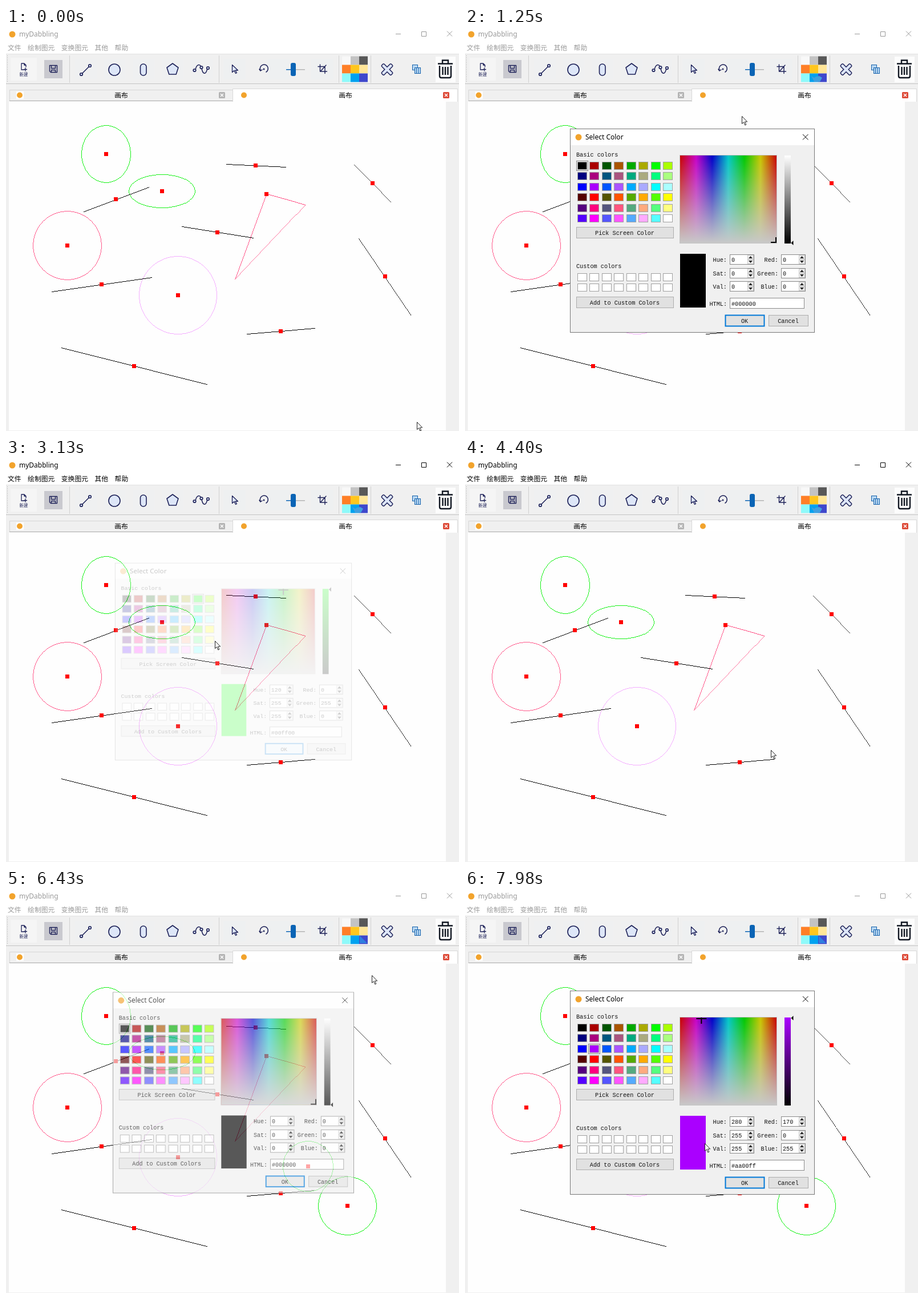
Animation of 794x705 px, one loop 8000 ms. Source, as an HTML page:

```html
<!DOCTYPE html>
<html lang="zh">
<head>
<meta charset="utf-8">
<style>
html, body { margin: 0; width: 100%; height: 100%; overflow: hidden; background: #f0f0f0; }
svg { display: block; width: 100vw; height: 100vh; }
text { font-family: "Noto Sans", "Noto Sans CJK SC", "Noto Sans CJK", sans-serif; font-size: 12px; white-space: pre; }
.cjk { font-family: "Noto Sans CJK SC", "Noto Sans CJK", sans-serif; font-size: 11.8px; }
.mono { font-family: "Liberation Mono", monospace; font-size: 10.2px; fill: #111; }
.crisp { shape-rendering: crispEdges; }
.mid { text-anchor: middle; }
.end { text-anchor: end; }
</style>
</head>
<body>
<svg id="stage" viewBox="0 0 794 705" preserveAspectRatio="none"></svg>
<script>
const stage = document.getElementById('stage');
const NAVY = '#1d2158', PALE = '#dde6f8', LOGO = '#f2a32c';
const GREEN = '#00f000', PINK = '#ff4a80', VIOLET = '#f3a6ff';

// Markup helpers
const tag = (name, attrs, body = '') =>
  `<${name} ${Object.entries(attrs).map(([k, v]) => `${k}="${v}"`).join(' ')}>${body}</${name}>`;
const rect = (x, y, width, height, fill, more) => tag('rect', { x, y, width, height, fill, ...more });
const box = (x, y, w, h, fill, stroke, more) => rect(x + .5, y + .5, w, h, fill, { stroke, ...more });
const path = (d, stroke, width = 1, fill = 'none', more) =>
  tag('path', { d, stroke, 'stroke-width': width, fill, ...more });
const disc = (cx, cy, r, fill, more) => tag('circle', { cx, cy, r, fill, ...more });
const text = (x, y, s, more) => tag('text', { x, y, ...more }, s);
const mono = (x, y, s, cls = '', more) => text(x, y, s, { class: 'mono ' + cls, ...more });
const each = (n, f) => Array.from({ length: n }, (_, i) => f(i)).join('');
const crisp = { class: 'crisp' };

function chrome() {
  let x = 3;
  const menu = ['文件', '绘制图元', '变换图元', '其他', '帮助'].map(s => {
    const item = text(x, 39, s, { class: 'cjk', fill: 'currentColor' });
    x += s.length * 11.8 + 11.5;
    return item;
  }).join('');
  return rect(0, 0, 794, 705, '#f0f0f0') + rect(0, 0, 794, 45, '#fff') + disc(11, 11, 5.5, LOGO)
    + tag('g', { id: 'frame' }, text(23, 15, 'myDabbling', { fill: 'currentColor' }) + menu
      + path('M683 10.5h9M728.5 6.5h8v8h-8zM773 5.5l9 9m0-9l-9 9', 'currentColor'));
}

function toolbar() {
  const cells = ['#f8f8f8', '#c3c3c3', '#585858', '#ff7f27', '#ffc61e', '#ffe699', '#8efafa', '#00a2f0', '#3f48cc'];
  const ink = { stroke: NAVY, 'stroke-width': 1.6, 'stroke-linejoin': 'round' };
  const lines = (d, w = 1.5, fill) => path(d, NAVY, w, fill, { 'stroke-linejoin': 'round', 'stroke-linecap': 'round' });
  const knob = (x, y) => disc(x, y, 2.3, PALE, ink);
  const corners = Array.from({ length: 5 }, (_, i) =>
    [292 + 10.5 * Math.sin(i * Math.PI * .4), 72.5 - 10.5 * Math.cos(i * Math.PI * .4)]);
  const bars = (w, color, more) => [45, 135].map(a =>
    rect(668 - 11, 72.5 - w / 2, 22, w, color, { rx: 1, transform: `rotate(${a} 668 72.5)`, ...more })).join('');
  return path('M0 45.5h794', '#e2e2e2') + path('M0 97.5h794', '#c4c4c4')
    + path('M2.5 48v47', '#a5a5a5', 1, 'none', { 'stroke-dasharray': '1 2' })
    + [111, 373, 583, 639].map(x => rect(x, 48, 1, 48, '#d0d0d0')).join('')
    + rect(8, 52, 46, 40, '#f5f5f5') + rect(67, 56, 32, 32, '#c9c9cf')
    + lines('M32 73h-5v-11h5l3 3v3M32 62v3h3M34 70v5M31.5 72.5h5', 1.3)
    + text(31, 84, '新建', { class: 'cjk mid', fill: NAVY, style: 'font-size:7.5px' })
    + lines('M76.5 65.5h13v12h-11l-2-2zM79.5 65.5v5h7v-5M79.5 77v-3.5h7v3.5', 1.4)
    + each(5, i => rect(121 + i * 50.75, 54, 38, 36, '#eff0f1'))
    + lines('M132 81l15-15') + knob(132, 81) + knob(147, 66)
    + disc(190, 73, 10, PALE, ink) + rect(235.5, 63, 10.5, 20, PALE, { rx: 5, ...ink })
    + tag('polygon', { points: corners.join(' '), fill: PALE, ...ink })
    + lines('M332 73c2-10 9-12 11-2s7 12 10 0') + knob(330.5, 74) + knob(342.5, 69) + knob(354, 70)
    + each(3, i => rect(381 + i * 77, 54, 39, 36, '#eef0f1'))
    + lines('M396.5 64.5v13l3.5-3l2.5 5l2-1l-2.5-4.5h4.5z', 1.3, PALE)
    + lines('M446 74a7 7 0 1 1 10 3M444 72l2 3l3-2') + disc(452, 72, 1.4, NAVY)
    + rect(491, 72, 9, 1.5, '#0b64b5') + rect(508, 72, 16, 1.5, '#b5b5b5')
    + rect(499, 61, 9, 23, '#0b64b5', { rx: 3 })
    + lines('M550.5 64v12h12M547 67.5h12v12M551 76l10-11', 1.4)
    + cells.map((c, i) => rect(589 + i % 3 * 15, 49.5 + (i / 3 | 0) * 15, 15, 15, c)).join('')
    + path('M607 84l5 3l3-2l6-1l5 3l-4 7h-10z', 'none', 0, '#3f9fe0', { id: 'smudgeA' })
    + path('M620 80v13h13z', 'none', 0, '#2f7fe0', { id: 'smudgeB' })
    + bars(4.5, PALE, { stroke: NAVY, 'stroke-width': 3 }) + bars(4.5, PALE)
    + box(712, 64, 9, 9, '#b9d8f2', '#1763ad') + box(716, 69, 10, 10, '#b9d8f2', '#1763ad')
    + path('M719.5 69v10M723 69v10', '#1763ad')
    + rect(753, 50, 35, 45, '#fcfcfc')
    + path('M757 62.5h26M765 62v-5.5h10v5.5M760 66v18q0 3 3 3h14q3 0 3-3v-18', '#111722', 2.4)
    + each(3, i => rect(764.3 + i * 4.5, 68, 2.4, 14, '#111722'));
}

function tabs() {
  const tab = (x, close, color) => disc(x, 117.5, 5, LOGO)
    + text(x + 178, 121.5, '画布', { class: 'cjk mid' })
    + rect(close - 5.5, 112, 11, 11, color, { rx: 1.5 })
    + path(`M${close - 2.5} 115l5 5m0-5l-5 5`, '#fff', 1.4);
  return rect(5, 128, 766, 576, '#fefefe')
    + box(6, 108, 391, 19, '#f0f0f0', '#d6d6d6') + box(397, 106, 394, 22, '#fff', '#d9d9d9')
    + rect(6, 127, 391, 1, '#a8a8a8') + rect(398, 126, 393, 3, '#fefefe') + rect(18, 111, 13, 13, '#fff')
    + tab(24, 378.5, '#b4b4b4') + tab(417, 771.5, '#dd4b39');
}

// Canvas shapes: one pixel along the longer axis, no smoothing
const dot = (x, y) => rect(x - 3, y - 3, 7, 7, '#f00', crisp);
const ring = (cx, cy, rx, ry, stroke) => tag('ellipse',
  { cx: cx + .5, cy: cy + .5, rx, ry, stroke, 'stroke-width': .9, fill: 'none', ...crisp }) + dot(cx, cy);
function line(x, y, x2, y2, color = '#000') {
  const dx = x2 - x, dy = y2 - y;
  const width = Math.max(Math.abs(dx), Math.abs(dy)) / Math.hypot(dx, dy);
  return path(`M${x + .5} ${y + .5}l${dx} ${dy}`, color, width, 'none', crisp);
}
const handled = (x, y, x2, y2) => line(x, y, x2, y2) + dot((x + x2) >> 1, (y + y2) >> 1);

const drags = [
  { cx: 529, cy: 483, r: 44, from: 4540, to: 4690, turn: .7 },
  { cx: 598, cy: 552, r: 51, from: 4910, to: 5120, turn: .6 },
];

function drawing() {
  return ring(175, 220, 43, 50, GREEN) + ring(273, 285, 58, 29, GREEN)
    + ring(107, 380, 60, 60, PINK) + ring(301, 467, 68, 68, VIOLET)
    + line(456, 290, 524, 309, PINK) + line(524, 309, 401, 439, PINK) + line(401, 439, 456, 290, PINK)
    + dot(456, 290)
    + handled(385, 238, 490, 243) + handled(610, 238, 674, 304)
    + handled(135, 321, 250, 278) + handled(307, 347, 433, 367)
    + handled(79, 461, 255, 436) + handled(421, 535, 541, 525)
    + handled(618, 367, 710, 502) + handled(96, 559, 352, 623)
    + drags.map((d, i) => tag('g', { id: 'drag' + i }, ring(d.cx, d.cy, d.r, d.r, GREEN))).join('');
}

// Colour dialog: swatches run down the columns, blue fastest, then red, then green
const swatchX = i => 197 + Math.round((i / 6 | 0) * 21.43);
const swatchY = i => 234 + Math.round(i % 6 * 18.4);
const swatchRgb = i => [(i / 3 | 0) % 4 * 85, (i / 12 | 0) * 85, Math.floor(i % 3 * 127.5)];
const css = rgb => `rgb(${rgb})`;

function dialog() {
  const stop = (offset, color, opacity = 1) => tag('stop', { offset, 'stop-color': color, 'stop-opacity': opacity });
  const fade = (id, stops, more) => tag('linearGradient', { id, ...more }, stops);
  const down = { x2: 0, y2: 1 };
  const defs = tag('defs', {}, fade('hue', each(7, i => stop(i / 6, `hsl(${360 - i * 60},100%,39.2%)`)))
    + fade('sat', stop(0, '#c8c8c8', 0) + stop(1, '#c8c8c8'), down)
    + fade('val', '<stop id="valTop"/>' + stop(1, '#000'), down)
    + tag('clipPath', { id: 'field' }, rect(377, 223, 169, 153, '#000')));
  const button = (x, y, w, s, more) => box(x, y, w, 19, '#e1e1e1', '#adadad', more) + mono(x + w / 2, y + 14, s, 'mid');
  const cell = (i, y, color) => box(swatchX(i), y, 16, 13, color, '#a0a0a0');
  const spin = (s, i) => {
    const x = i < 3 ? 464 : 554, y = 396 + Math.round(i % 3 * 23.5);
    return mono(x - 5, y + 13, s, 'end') + box(x, y, 42, 17, '#fff', '#8a8a8a') + mono(x + 3, y + 13, '', '', { id: 'num' + i })
      + each(2, k => box(x + 31, y + 1 + k * 8, 10, 7, '#f0f0f0', '#c8c8c8'))
      + path(`M${x + 33} ${y + 7}h7l-3.5-4zm0 4h7l-3.5 4z`, 'none', 0, '#222');
  };
  return defs + box(184, 176, 428, 356, '#f0f0f0', '#777') + rect(185, 177, 427, 28, '#fff')
    + disc(199, 191, 5.5, LOGO) + text(211, 195, 'Select Color') + path('M592 186l9.5 9.5m0-9.5l-9.5 9.5', '#000')
    + mono(195, 225, 'Basic colors') + mono(195, 420, 'Custom colors')
    + each(48, i => cell(i, swatchY(i), css(swatchRgb(i))))
    + each(16, i => cell((i >> 1) * 6, 429 + i % 2 * 18, '#fff'))
    + rect(0, 0, 20, 17, 'none', { id: 'pick', stroke: '#888' })
    + button(195, 348, 170, 'Pick Screen Color') + button(195, 470, 170, 'Add to Custom Colors')
    + rect(377, 223, 169, 153, 'url(#hue)') + rect(377, 223, 169, 153, 'url(#sat)')
    + box(376, 222, 170, 154, 'none', '#c4c4c4')
    + tag('g', { 'clip-path': 'url(#field)' }, path('M-9 0h18M0-9v18', '#000', 2, 'none', { id: 'cross' }))
    + rect(560, 223, 11, 154, 'url(#val)') + path('M0 0l4-4v8z', 'none', 0, '#000', { id: 'mark' })
    + rect(377, 395, 45, 94, '#000', { id: 'sample' })
    + ['Hue:', 'Sat:', 'Val:', 'Red:', 'Green:', 'Blue:'].map(spin).join('')
    + mono(459, 486, 'HTML:', 'end') + box(464, 472, 130, 18, '#fff', '#8a8a8a') + mono(467, 486, '', '', { id: 'html' })
    + button(456, 502, 68, 'OK', { id: 'ok', stroke: '#0078d7', 'stroke-width': 2 }) + button(532, 502, 69, 'Cancel');
}

stage.innerHTML = chrome() + toolbar() + tabs() + drawing() + tag('g', { id: 'dialog' }, dialog())
  + path('M.5 .5v13l3-2.8l2.3 5.3l2-.9l-2.3-5.1h4.2z', '#222', 1, '#fff', { id: 'cursor' });
const $ = id => document.getElementById(id);
const set = (id, attrs) => { for (const k in attrs) $(id).setAttribute(k, attrs[k]); };
const show = (id, on) => set(id, { visibility: on ? 'visible' : 'hidden' });
const ramp = (t, from, length) => Math.max(0, Math.min(1, (t - from) / length));

const LOOP = 8000;
const runs = [0, 70, 950, 1790, 2650, 3510, 4400, 5280, 6190, 7050, 7900];
function tick(now) {
  const start = runs.filter(r => r <= now).pop();
  return start + Math.floor(Math.floor((now - start + 9) / 78) * 7.8) * 10;
}

// Pointer: stops with arrival and departure, plus a few points on the way
const lime = 36, purple = 8;
const stay = (from, to, x, y) => [[from, x, y], [to, x, y]];
const onSwatch = (from, to, i) => stay(from, to, swatchX(i) + 5, swatchY(i) + 7);
const onPalette = (from, to) => stay(from, to, 617, 83);
const drag = d => [[d.from, d.cx, d.cy],
  ...stay(d.to, d.to + 70, d.cx + d.r * Math.cos(d.turn), d.cy + d.r * Math.sin(d.turn))];
const route = [
  ...stay(0, 70, 720, 689), ...onPalette(780, 950), [1020, 537, 125],
  ...onSwatch(1650, 1790, lime), [2020, 413, 382], ...stay(2280, 2960, 487, 515), [3110, 366, 318],
  ...stay(3600, 3760, 190, 73), [4400, 536, 509], ...drags.flatMap(drag), [5280, 637, 570],
  ...onPalette(5650, 6270), [6420, 641, 149], ...onSwatch(7360, 7500, purple), [7970, 420, 443],
];

function pointer(t) {
  const next = route.findIndex(k => k[0] > t);
  if (next < 0) return route[route.length - 1].slice(1);
  const [a, x, y] = route[next - 1], [b, x2, y2] = route[next], p = (t - a) / (b - a);
  return [Math.round(x + (x2 - x) * p), Math.round(y + (y2 - y) * p)];
}

function hsv([r, g, b]) {
  const max = Math.max(r, g, b), span = max - Math.min(r, g, b);
  if (!span) return [0, 0, max];
  const sector = max === r ? (g - b) / span + 6 : max === g ? (b - r) / span + 2 : (r - g) / span + 4;
  return [Math.round(sector * 60) % 360, Math.round(span / max * 255), max];
}

function choose(i) {
  const rgb = swatchRgb(i), [h, s, v] = hsv(rgb);
  [h, s, v, ...rgb].forEach((n, k) => { $('num' + k).textContent = n; });
  $('html').textContent = '#' + rgb.map(n => n.toString(16).padStart(2, '0')).join('');
  set('sample', { fill: css(rgb) });
  set('valTop', { 'stop-color': v ? css(rgb.map(n => n / v * 255)) : '#fff' });
  set('pick', { x: swatchX(i) - 1.5, y: swatchY(i) - 1.5 });
  set('cross', { transform: `translate(${377 + (360 - h) / 360 * 168} ${225 + (255 - s) / 255 * 150})` });
  set('mark', { transform: `translate(571.5 ${376 - v / 255 * 152})` });
}

function draw(now) {
  const t = tick(now);
  set('cursor', { transform: `translate(${pointer(t)})` });
  $('frame').style.color = t >= 770 && t < 950 || t >= 3030 && t < 6340 ? '#000' : '#999';
  show('smudgeA', t >= 770 && t < 5650);
  show('smudgeB', t >= 5650);
  drags.forEach((d, i) => {
    const r = d.r * ramp(t, d.from, d.to - d.from);
    show('drag' + i, r > 0);
    $('drag' + i).firstChild.setAttribute('rx', r);
    $('drag' + i).firstChild.setAttribute('ry', r);
  });
  const open = ramp(t, 919, 155) - ramp(t, 2986, 155) + ramp(t, 6319, 155);
  show('dialog', open > 0);
  set('dialog', { opacity: open, transform: `translate(399 354.5) scale(${.96 + .04 * open}) translate(-399 -354.5)` });
  set('ok', { fill: t >= 2280 && t < 4000 ? '#e5f1fb' : '#e1e1e1' });
  choose(t >= 7430 ? purple : t >= 1790 && t < 4000 ? lime : 0);
}

const begin = performance.now();
function loop() {
  draw((performance.now() - begin) % LOOP);
  requestAnimationFrame(loop);
}
loop();
</script>
</body>
</html>
```
